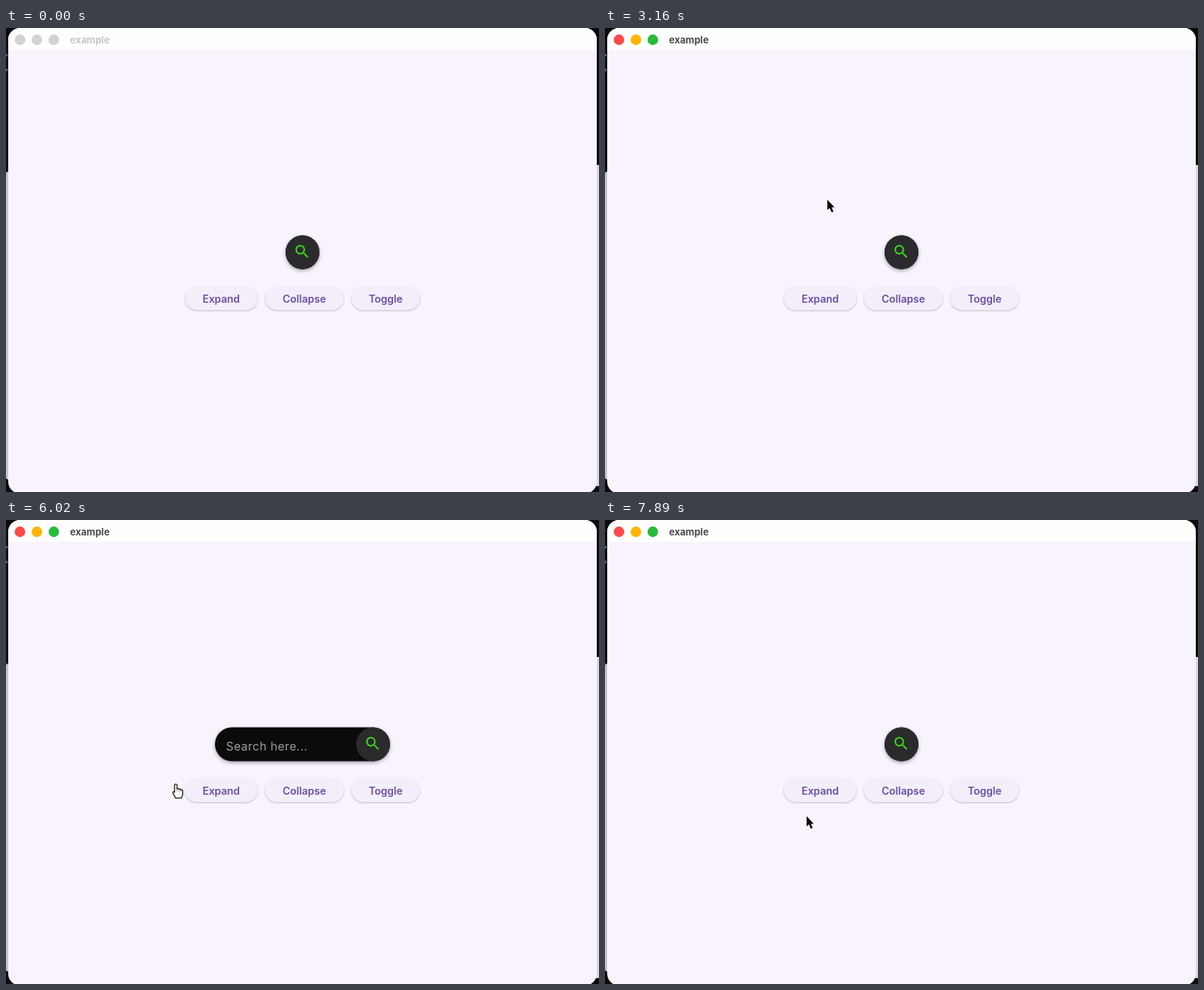
Write an HTML page that moves like this. It is 806 px wide and 630 px high and loops after 7990 ms.

```html
<!DOCTYPE html>
<html lang="en">
<head>
<meta charset="utf-8">
<title>Expanding search field</title>
<style>
  html, body { margin: 0; width: 100%; height: 100%; overflow: hidden; background: #0b0b0c; }
  svg { display: block; width: 100vw; height: 100vh; }
  text { font-family: Inter, Roboto, "Liberation Sans", sans-serif; }
  .label { font-size: 14px; font-weight: 600; fill: #6750a4; text-anchor: middle; }
  .button { fill: #f4eefa; filter: drop-shadow(0 1px 1px rgba(0, 0, 0, .24)); }
  #field { fill: #0b0b0b; filter: drop-shadow(0 2px 2.5px rgba(0, 0, 0, .36)); }
  #title { font-size: 13px; font-weight: 700; }
  #hint { font-size: 16px; letter-spacing: .4px; fill: #9c9c9c; }
</style>
</head>
<body>
<svg viewBox="0 0 806 630" preserveAspectRatio="none">
  <defs>
    <clipPath id="win"><rect x="3" y="0" width="800" height="632" rx="16"/></clipPath>
    <clipPath id="fieldClip"><rect id="clipBox" y="281.5" height="46" rx="23"/></clipPath>
  </defs>

  <!-- desktop behind the window -->
  <rect width="806" height="630" fill="#0b0b0c"/>
  <rect y="195" width="14" height="418" rx="3" fill="#c6c4c9"/>
  <rect x="792" y="186" width="14" height="436" fill="#d9d7dc"/>
  <path d="M0 37h2M0 57h2" stroke="#6c6c84" stroke-width="3"/>

  <g clip-path="url(#win)">
    <rect width="806" height="630" fill="#f9f3fe"/>
    <rect width="806" height="30" fill="#fefefe"/>
  </g>
  <g id="lights"></g>
  <text id="title" x="87" y="21">example</text>

  <g id="buttons"></g>

  <rect id="field" y="281.5" height="46" rx="23"/>
  <g clip-path="url(#fieldClip)">
    <text id="hint" y="312.5">Search here...</text>
    <rect id="caret" y="295" width="2" height="23" fill="#6f6f88"/>
  </g>
  <g id="knob">
    <circle r="23" fill="#2b2b2d"/>
    <path transform="translate(-12.5 -13)" fill="#3bd61c" fill-rule="evenodd"
      d="M15.5 14h-.8l-.3-.3A6.5 6.5 0 1 0 13.7 14.4l.3.3v.8l5 5L20.5 19ZM9.5 14a4.5 4.5 0 1 1 0-9a4.5 4.5 0 0 1 0 9Z"/>
  </g>

  <g id="cursor">
    <path id="arrow" d="M0 0V14L3.2 11.3L5.8 17.2L8.3 16.1L5.8 10.4H9.8Z"
      fill="#060606" stroke="#fff" stroke-width="1" paint-order="stroke"/>
    <g id="hand">
      <path d="M-1.6 11.8V1.7Q0-.8 1.7 1.7V7.2Q3.4 5.8 4.4 7.6Q6.2 6.4 7 8.5Q9.2 7.6 9.4 10.2V14Q9.2 17 7.4 19.6H-.2Q-1.6 16.6-3.6 13.4C-4.8 11.2-3 9.6-1.6 11.8Z"
        fill="#fff" stroke="#2e2e30" stroke-width="1.5" stroke-linejoin="round"/>
      <path d="M1.7 7.2V10.5M4.4 8V10.8M7 8.6V11" stroke="#626264" stroke-width=".8"/>
    </g>
    <g id="beam" fill="none">
      <path id="beamShape" d="M-3-8Q0-8 0-5.5Q0-8 3-8M0-5.5V5.5M-3 8Q0 8 0 5.5Q0 8 3 8M-2 3H2"
        stroke="#e2e2e2" stroke-width="2.6"/>
      <path d="M-3-8Q0-8 0-5.5Q0-8 3-8M0-5.5V5.5M-3 8Q0 8 0 5.5Q0 8 3 8M-2 3H2"
        stroke="#141414" stroke-width="1"/>
    </g>
  </g>
</svg>
<script>
const LOOP = 7990;
const FOCUS_AT = 1700;
const OPEN_AT = 4047, CLOSE_AT = 6500, SLIDE = 300;
const CENTER = 403, MIN_W = 46, MAX_W = 238;

const $ = id => document.getElementById(id);
const clamp = v => Math.max(0, Math.min(1, v));
const show = (id, on) => $(id).setAttribute("visibility", on ? "visible" : "hidden");

function set(id, attrs) {
  for (const key in attrs) $(id).setAttribute(key, attrs[key]);
}

function add(parent, tag, attrs, text = "") {
  const el = document.createElementNS("http://www.w3.org/2000/svg", tag);
  for (const key in attrs) el.setAttribute(key, attrs[key]);
  el.textContent = text;
  $(parent).append(el);
  return el;
}

const lights = ["#ff4a48", "#ffb400", "#27bb3c"].map((color, i) =>
  ({ color, el: add("lights", "circle", { cx: 19 + i * 23, cy: 16, r: 7.2 }) }));

for (const [label, x, width] of [["Expand", 243, 99], ["Collapse", 352, 107], ["Toggle", 469.5, 93]]) {
  add("buttons", "rect", { class: "button", x, y: 351, width, height: 32, rx: 16 });
  add("buttons", "text", { class: "label", x: x + width / 2, y: 372.5 }, label);
}

// Pointer waypoints: time, x, y
const path = [
  [760, -8, 128], [1400, 124, 173], [2400, 124, 173], [3160, 302, 233],
  [3750, 400, 303], [4300, 400, 303], [4820, 296, 351], [5180, 296, 351],
  [5860, 274, 358], [6020, 231, 358], [6400, 143, 412], [6980, 143, 412],
  [7560, 229, 418], [7890, 274, 402]
];

// Pointer shape from each time on
const shapes = [[0, "arrow"], [3600, "hand"], [4120, "beam"], [4560, "arrow"], [4760, "hand"], [6050, "arrow"]];

function slope(i, axis) {
  const a = path[i], b = path[i + 1];
  return a && b ? (b[axis] - a[axis]) / (b[0] - a[0]) : 0;
}

// Velocity at a waypoint; zero at rests and turning points
function velocity(i, axis) {
  const before = slope(i - 1, axis), after = slope(i, axis);
  return before * after > 0 ? 2 * before * after / (before + after) : 0;
}

function pointerAt(t) {
  const next = path.findIndex(p => p[0] > t);
  if (next < 0) return path[path.length - 1].slice(1);
  if (next === 0) return path[0].slice(1);
  const i = next - 1, from = path[i], to = path[next];
  const span = to[0] - from[0], k = (t - from[0]) / span, blend = k * k * (3 - 2 * k);
  return [1, 2].map(axis =>
    from[axis] + (to[axis] - from[axis]) * blend
    + span * k * (1 - k) * ((1 - k) * velocity(i, axis) - k * velocity(next, axis)));
}

function draw(t) {
  const focused = t >= FOCUS_AT;
  for (const { el, color } of lights) el.setAttribute("fill", focused ? color : "#d3d3d3");
  set("title", { fill: focused ? "#4a4a4a" : "#c6c6c6" });

  const open = clamp((t - OPEN_AT) / SLIDE) - clamp((t - CLOSE_AT) / SLIDE);
  const width = MIN_W + (MAX_W - MIN_W) * open;
  const x = CENTER - width / 2;
  set("field", { x, width });
  set("clipBox", { x, width });
  set("knob", { transform: `translate(${x + width - 23} 304.5)` });
  set("hint", { x: x + 15 * open });
  set("caret", { x: x + 15 * open });
  show("hint", open > 0);
  show("caret", open > 0 && t < CLOSE_AT && (t - OPEN_AT) % 1000 < 500);

  const [px, py] = pointerAt(t);
  set("cursor", { transform: `translate(${px} ${py})` });
  const shape = shapes.filter(s => s[0] <= t).pop()[1];
  for (const id of ["arrow", "hand", "beam"]) show(id, t >= path[0][0] && id === shape);
}

const start = performance.now();
function tick() {
  draw((performance.now() - start) % LOOP);
  requestAnimationFrame(tick);
}
tick();
</script>
</body>
</html>
```
